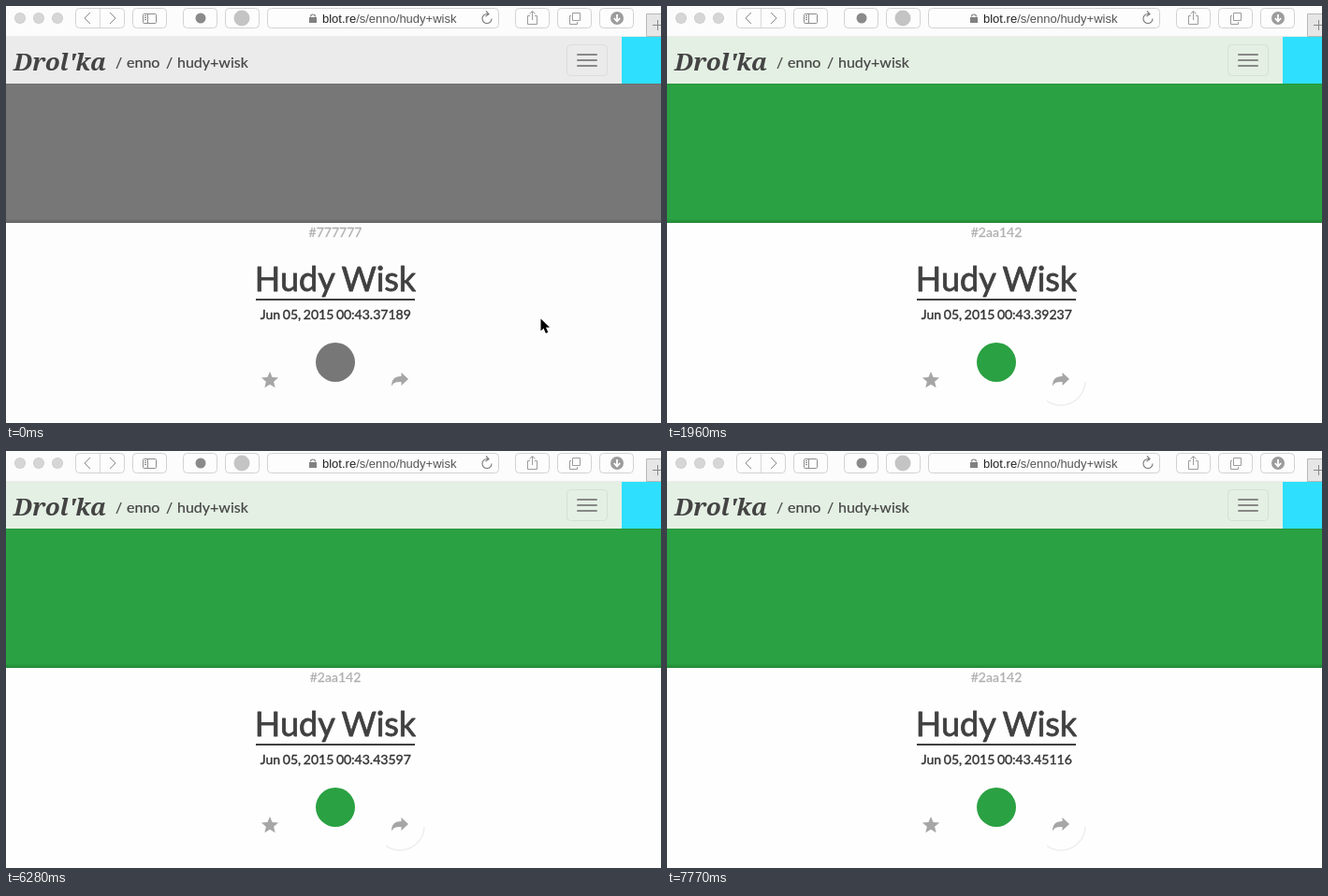
Write an HTML page with a canvas that moves like this. It is 700 px wide and 446 px high and loops after 8 s.

```html
<!DOCTYPE html>
<html lang="en">
<head>
<meta charset="utf-8">
<title>Colour stream</title>
<style>
html, body { margin: 0; width: 100%; height: 100%; overflow: hidden; background: #fefefe; }
canvas { display: block; }
</style>
</head>
<body>
<canvas id="stage" width="700" height="446"></canvas>
<script>
const ctx = document.getElementById('stage').getContext('2d');
const LOOP = 8000;
const USER = 'enno', TITLE = 'Hudy Wisk', SLUG = 'hudy+wisk';

// Moments at which the stream delivers an update
const updates = [0, 150, 310, 470, 770, 920, 1210, 1510, 1810, 1960, 2260, 2560, 2710,
  3000, 3300, 3450, 3750, 4040, 4190, 4490, 4790, 5090, 5240, 5540, 5830, 5980,
  6280, 6580, 6730, 7030, 7330, 7620, 7770];

// [time, [colour, navigation bar tint]]
const grey = ['#777777', '#ebebeb'], red = ['#dc4343', '#fce4e4'], green = ['#2aa142', '#e4f0e4'];
const pine = ['#247415', '#e0eadf'], blue = ['#4b4db9', '#e3e5f2'];
const colours = [[0, grey], [310, green], [770, red], [920, pine], [1810, green],
  [6580, red], [6730, blue], [7330, green]];

// [time, clock reading]
const clock = [[0, 37189], [770, 38015], [1510, 38761], [3450, 40811],
  [6280, 43597], [7030, 44374], [7770, 45116]];

const pointer = [[0, 571, 334], [150, 490, 383], [310, 428, 430]];

const latest = (list, t) => list.filter(e => e[0] <= t).pop();

function reading(t) {
  let i = 1;
  while (i < clock.length - 1 && clock[i][0] < t) i++;
  const [t0, a] = clock[i - 1], [t1, b] = clock[i];
  return Math.round(a + (b - a) * (t - t0) / (t1 - t0));
}

function rect(x, y, w, h, fill) {
  ctx.fillStyle = fill;
  ctx.fillRect(x, y, w, h);
}

function disc(x, y, r, fill) {
  ctx.fillStyle = fill;
  ctx.beginPath();
  ctx.arc(x, y, r, 0, Math.PI * 2);
  ctx.fill();
}

function text(s, x, y, font, fill, align = 'left') {
  ctx.font = font;
  ctx.fillStyle = fill;
  ctx.textAlign = align;
  ctx.fillText(s, x, y);
}

// Lato with narrow word gaps and a thin outline for a medium weight
function lato(s, x, y, size, fill, heft, align = 'left') {
  ctx.wordSpacing = -size * .07 + 'px';
  text(s, x, y, size + 'px Lato, sans-serif', fill, align);
  ctx.strokeStyle = fill;
  ctx.lineWidth = heft;
  ctx.lineJoin = 'round';
  ctx.strokeText(s, x, y);
  ctx.lineJoin = 'miter';
  ctx.wordSpacing = '0px';
}

function box(x, y, w, h, r, stroke, fill) {
  ctx.beginPath();
  ctx.roundRect(x + .5, y + .5, w - 1, h - 1, r);
  if (fill) { ctx.fillStyle = fill; ctx.fill(); }
  ctx.strokeStyle = stroke;
  ctx.lineWidth = 1;
  ctx.stroke();
}

function line(points, stroke, width = 1) {
  ctx.beginPath();
  points.forEach(([x, y], i) => i ? ctx.lineTo(x, y) : ctx.moveTo(x, y));
  ctx.strokeStyle = stroke;
  ctx.lineWidth = width;
  ctx.stroke();
}

function toolbar() {
  const ink = '#8c8c8c', pale = '#9c9c9c';
  rect(0, 0, 700, 32, '#fcfcfc');
  rect(0, 32, 700, 1, '#ececec');
  for (const x of [15, 35, 55]) {
    disc(x, 13, 6, '#cbcbcb');
    disc(x, 13, 5.2, '#d6d6d6');
  }
  const frame = (x, w) => box(x, 2, w, 22, 4, '#d2d2d2', '#fdfdfd');
  frame(74, 53);
  line([[100.5, 3], [100.5, 23]], '#d8d8d8');
  line([[90, 7], [84, 13], [90, 19]], ink);
  line([[111, 7], [117, 13], [111, 19]], ink);

  for (const x of [135, 189, 234, 544, 589, 634]) frame(x, 37);
  frame(279, 248);

  box(146, 8, 15, 11, 1, ink);
  line([[151.5, 8], [151.5, 19]], ink);
  for (const y of [10.5, 12.5, 14.5]) line([[148, y], [150, y]], ink);
  disc(208, 13, 5.5, '#8a8a8a');
  disc(252, 13, 8.5, '#c4c4c4');

  // Address
  rect(324, 12, 8, 6, '#808080');
  ctx.beginPath();
  ctx.arc(328, 11.5, 2.5, Math.PI, 0);
  ctx.strokeStyle = '#808080';
  ctx.lineWidth = 1.2;
  ctx.stroke();
  const font = '13px "Liberation Sans", sans-serif';
  text('blot.re', 338, 18, font, '#222');
  text('/s/' + USER + '/' + SLUG, 338 + ctx.measureText('blot.re').width, 18, font, '#555');
  ctx.beginPath();
  ctx.arc(514, 13.5, 5, 0, Math.PI * 1.6);
  ctx.strokeStyle = '#777';
  ctx.lineWidth = 1.1;
  ctx.stroke();
  line([[513, 5.5], [516, 8.7], [512.5, 11]], '#777', 1.1);

  // Share, tabs, downloads
  line([[560, 10.5], [557.5, 10.5], [557.5, 19.5], [567.5, 19.5], [567.5, 10.5], [565, 10.5]], pale);
  line([[562.5, 15], [562.5, 6]], pale);
  line([[559.5, 8.5], [562.5, 5.5], [565.5, 8.5]], pale);
  box(605, 7, 9, 9, 0, pale);
  line([[604, 10.5], [602.5, 10.5], [602.5, 19.5], [610.5, 19.5], [610.5, 17]], pale);
  disc(653, 13, 7, pale);
  line([[653, 9], [653, 16]], '#fff', 1.8);
  line([[649.8, 13], [653, 16.5], [656.2, 13]], '#fff', 1.8);

  box(684, 8, 20, 25, 0, '#b8b8b8', '#e6e6e6');
  line([[691, 20.5], [702, 20.5]], '#888');
  line([[696.5, 15], [696.5, 26]], '#888');
}

function navigation(tint) {
  rect(0, 33, 700, 50, tint);
  rect(658, 33, 42, 50, '#2ee0fd');
  text("Drol'ka", 8, 69, 'italic bold 26px "Noto Serif", serif', '#444');
  const crumbs = [['/', 117], [USER, 129], ['/', 171], [SLUG, 183]];
  for (const [s, x] of crumbs) lato(s, x, 66, 16, '#444', .2);
  box(599, 41, 44, 34, 4, 'rgba(0,0,0,.06)');
  ctx.fillStyle = '#888';
  for (const y of [51, 57, 63]) {
    ctx.beginPath();
    ctx.roundRect(610, y, 22, 2, 1);
    ctx.fill();
  }
}

function band(colour) {
  rect(0, 83, 700, 149, colour);
  rect(0, 83, 700, 1, 'rgba(0,0,0,.08)');
  for (let i = 0; i < 4; i++) rect(0, 228 + i, 700, 1, `rgba(0,0,0,${.04 + i * .035})`);
}

function star(x, y, r) {
  ctx.beginPath();
  for (let i = 0; i < 10; i++) {
    const a = -Math.PI / 2 + i * Math.PI / 5, d = i % 2 ? r * .45 : r;
    ctx.lineTo(x + d * Math.cos(a), y + d * Math.sin(a));
  }
  ctx.fillStyle = '#a6a6a6';
  ctx.fill();
}

function shareArrow() {
  ctx.fillStyle = '#a6a6a6';
  ctx.fill(new Path2D('M430 399 L422.5 392 V396 C415 396 412 400 412 406.5 C414.5 402.5 417 402 422.5 402 V406 Z'));
}

// The hover ring is wiped in parts as the page above it repaints
function ring(t) {
  if (t < 310) return;
  ctx.save();
  ctx.beginPath();
  ctx.rect(406, t < 920 ? 370 : 402, 50, 76);
  ctx.clip();
  ctx.beginPath();
  ctx.arc(421, 401, 26, 0, Math.PI * 2);
  ctx.strokeStyle = '#efefef';
  ctx.lineWidth = 1.6;
  ctx.stroke();
  ctx.restore();
}

function cursor(t) {
  if (t >= 470) return;
  const [, x, y] = latest(pointer, t);
  ctx.save();
  ctx.translate(x, y);
  const shape = new Path2D('M.5 .5 V13.5 L3.5 10.7 L5.9 16 L8.3 15 L6 9.8 H10 Z');
  ctx.strokeStyle = '#fff';
  ctx.lineWidth = 2;
  ctx.stroke(shape);
  ctx.fillStyle = '#000';
  ctx.fill(shape);
  ctx.restore();
}

function draw(t) {
  const [colour, tint] = latest(colours, t)[1];
  const step = updates.filter(u => u <= t).pop();
  rect(0, 0, 700, 446, t < 310 ? '#fdfdfd' : '#fefefe');
  toolbar();
  navigation(tint);
  band(colour);
  lato(colour, 352, 247, 14, '#b0b0b0', .3, 'center');
  lato(TITLE, 352, 305, 36, '#404040', .8, 'center');
  rect(267, 313, 170, 2, '#404040');
  lato('Jun 05, 2015 00:43.' + reading(step), 352.3, 335, 14, '#333', .4, 'center');
  disc(352, 381, 21, colour);
  star(282, 400.5, 9.6);
  ring(t);
  shareArrow();
  cursor(t);
}

const start = performance.now();
function tick() {
  draw((performance.now() - start) % LOOP);
  requestAnimationFrame(tick);
}
tick();
</script>
</body>
</html>
```
